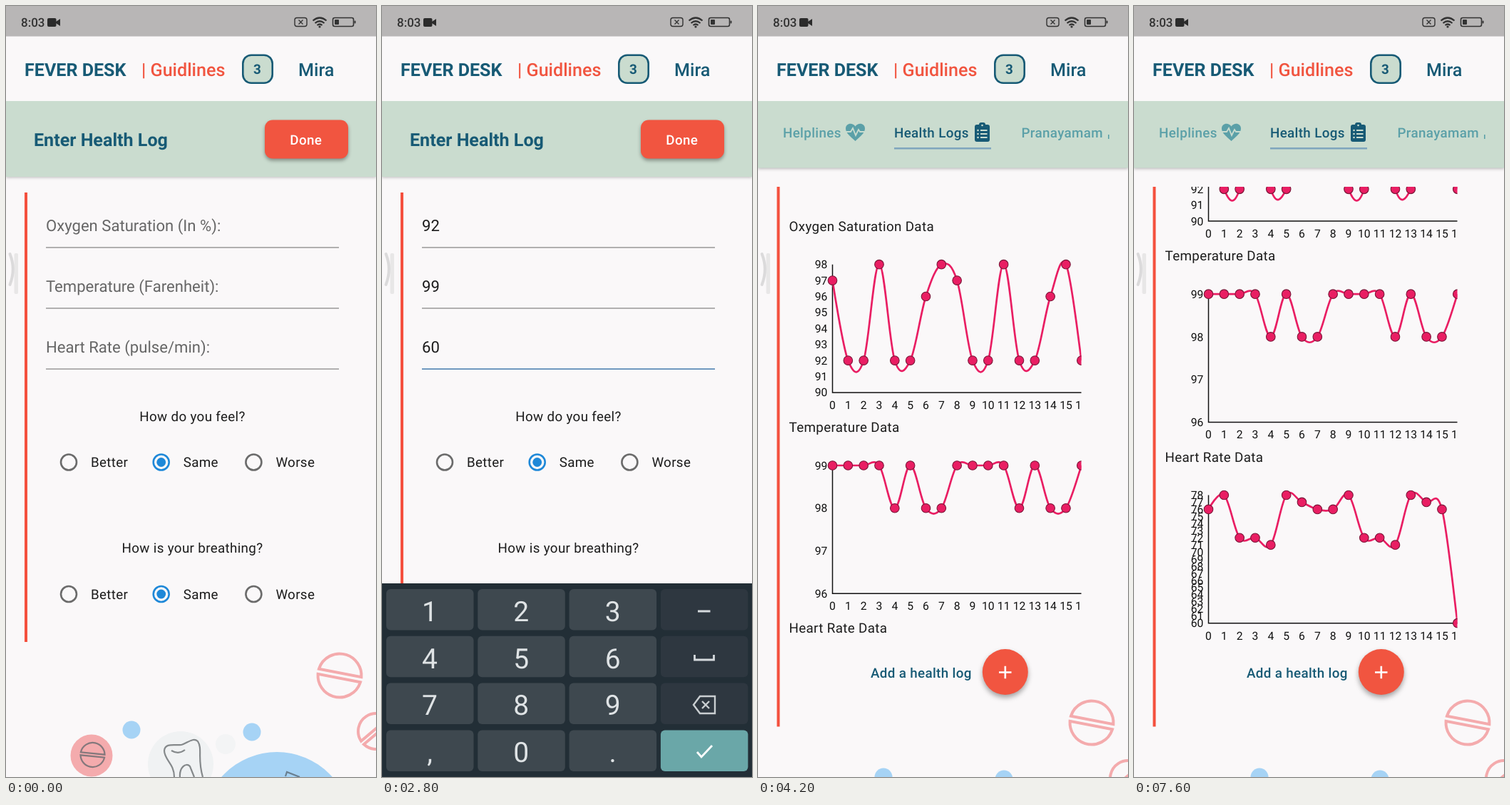
An HTML page with a canvas that plays this animation: 519x1079 px, repeating every 7.7 s.

```html
<!DOCTYPE html>
<html lang="en">
<head>
<meta charset="utf-8">
<title>Health log</title>
<style>
  html, body { margin: 0; height: 100%; overflow: hidden; background: #faf8f9; }
  canvas { display: block; width: 519px; height: 1079px; }
</style>
</head>
<body>
<canvas id="stage" width="519" height="1079"></canvas>
<script>
const W = 519, H = 1079, LOOP = 7700, STEP = 100, BODY = 18.8, FIELD = 22.1, HEAD = 25.1;
const PAPER = '#faf8f9', GREEN = '#cadccf', NAVY = '#175a75', RED = '#f15540', TEAL = '#5ba0a8',
      PINK = '#e91e63', BLUE = '#1e88d8', INK = '#1c1c1c', GREY = '#6b6b6b', ROSE = '#f4abad', SKY = '#a6d3f5';
const c = document.getElementById('stage').getContext('2d');
c.textRendering = 'geometricPrecision';
let t = 0;

const ramp = (a, b) => Math.min(1, Math.max(0, (t - a) / (b - a)));
const easeOut = p => 1 - (1 - p) ** 3;

function text(str, x, y, color = INK, size = BODY, weight = 400, align = 'left') {
  c.font = `${weight} ${size}px Roboto, sans-serif`;
  c.letterSpacing = size === BODY ? '0.34px' : '0px';
  c.textAlign = align;
  c.fillStyle = color;
  c.fillText(str, x, y + size * 0.355);
}
function rect(x, y, w, h, color, r = 0) {
  c.beginPath();
  c.roundRect(x, y, w, h, r);
  c.fillStyle = color;
  c.fill();
}
function disc(x, y, r, color) {
  c.beginPath();
  c.arc(x, y, r, 0, 7);
  c.fillStyle = color;
  c.fill();
}
function stroke(path, color, width) {
  c.strokeStyle = color;
  c.lineWidth = width;
  c.stroke(new Path2D(path));
}
const fill = (path, color) => { c.fillStyle = color; c.fill(new Path2D(path)); };

function shadowed(blur, dy, alpha, draw) {
  c.save();
  c.shadowBlur = blur;
  c.shadowOffsetY = dy;
  c.shadowColor = `rgba(0,0,0,${alpha})`;
  draw();
  c.restore();
}
function clipped(x, y, w, h, draw) {
  c.save();
  c.beginPath();
  c.rect(x, y, w, h);
  c.clip();
  draw();
  c.restore();
}

// ---------- shared chrome ----------
function statusBar() {
  rect(0, 0, W, 42.5, '#b8b6b6');
  text('8:03', 21, 23, '#333', 17, 500);
  let x = 58;
  if (t >= 300 && t < 2800) {
    rect(60, 18, 15, 9, '#444', 1);
    for (let i = 0; i < 5; i++) {
      rect(61.5 + i * 2.6, 20, 1.3, 1.3, '#b8b6b6');
      rect(61.5 + i * 2.6, 22.3, 1.3, 1.3, '#b8b6b6');
    }
    x = 82;
  }
  rect(x, 17, 12.5, 12, '#2b2b2b', 2);
  fill(`M${x + 12} 22l6 -4v10l-6 -4z`, '#2b2b2b');
  stroke('M408 16.5h11q3 0 3 3v6q0 3 -3 3h-11q-3 0 -3 -3v-6q0 -3 3 -3zM410.5 19.5l6 6m0 -6l-6 6', '#333', 1.4);
  stroke('M430.5 20.5q9.500 -8 19 0M433.500 24q6.500 -5.500 13 0M436.500 27q3.500 -3 7 0', '#333', 2.2);
  disc(440, 29, 1.6, '#333');
  stroke('M461 16.500h24q2.500 0 2.500 2.500v7q0 2.500 -2.500 2.500h-24q-2.500 0 -2.500 -2.500v-7q0 -2.500 2.500 -2.500z', '#333', 1.6);
  rect(461, 19, 6, 7, '#333', 1);
  rect(488.5, 20.5, 2, 4, '#333', 1);
}

function header(bandHeight) {
  shadowed(4, 1, 0.25, () => rect(0, 133, W, bandHeight, GREEN));
  rect(0, 42, W, 91, PAPER);
  text('FEVER DESK', 26, 89, NAVY, HEAD, 600);
  text('| Guidlines', 190, 89, RED, HEAD, 500);
  rect(331, 67.5, 44, 41.5, NAVY, 13);
  rect(333.6, 70, 38.8, 36.5, GREEN, 10.5);
  text('3', 352.5, 88.5, NAVY, BODY, 600, 'center');
  text('Mira', 410, 89, NAVY, HEAD, 500);
}

function pill(x, y, r, angle, color, width) {
  c.save();
  c.translate(x, y);
  c.rotate(angle);
  c.strokeStyle = color;
  c.lineWidth = width;
  for (const turn of [0, Math.PI]) {
    c.rotate(turn);
    c.beginPath();
    c.arc(0, 0, r, 0.12, Math.PI - 0.12);
    c.closePath();
    c.stroke();
  }
  c.restore();
}

function backdrop(dy) {
  c.save();
  c.translate(0, dy);
  pill(468, 937, 30.5, 0.19, ROSE, 4);
  pill(519, 1015, 25, -0.7, ROSE, 4);
  disc(176, 1013, 12.5, SKY);
  disc(345, 1016, 12.5, SKY);
  disc(120, 1049, 29.5, ROSE);
  pill(121.5, 1048, 17, 0.1, '#85787c', 2.2);
  disc(245, 1061, 46, '#f0f2f3');
  disc(308, 1033, 14, '#f3f4f5');
  stroke('M236 1079C236 1060 222 1055 222 1042C223 1031 236 1035 246 1034C254 1032 262 1023 269 1029' +
         'C276 1040 268 1052 276 1079M244 1079C243 1066 252 1058 258 1064L264 1079M232 1042q10 6 19 -1', '#85898b', 2.2);
  disc(380, 1148, 104, SKY);
  stroke('M392 1078l2 -6l18 7', '#6a7f90', 2.2);
  c.restore();
}

// ---------- form ----------
const presses = [[500, '9'], [700, '2'], [900, 'ok'], [1100, '9'], [1300, '9'], [1500, 'ok'],
                 [1700, '6'], [2500, '0'], [2600, 'ok']];

function formState() {
  const values = ['', '', ''];
  let focus = 0;
  for (const [at, key] of presses) {
    if (t < at + 100) break;
    if (key === 'ok') focus++;
    else values[focus] += key;
  }
  return { values, focus: t < 100 ? -1 : focus };
}

function question(title, y) {
  text(title, 261.5, y, INK, BODY, 400, 'center');
  ['Better', 'Same', 'Worse'].forEach((label, i) => {
    const x = 88 + i * 129.7, on = i === 1, color = on ? BLUE : GREY;
    c.beginPath();
    c.arc(x, y + 64.5, 11, 0, 7);
    c.strokeStyle = color;
    c.lineWidth = 2.6;
    c.stroke();
    if (on) disc(x, y + 64.5, 6.4, BLUE);
    text(label, x + 31, y + 64.5);
  });
}

function formPage() {
  rect(0, 0, W, H, PAPER);
  backdrop(0);
  header(106);
  text('Enter Health Log', 39, 187, NAVY, HEAD, 600);
  shadowed(5, 3, 0.35, () => rect(363, 159.5, 117, 54, RED, 11));
  text('Done', 420.7, 187, '#fff', BODY, 500, 'center');
  rect(26, 261, 4, 629, '#f4503e');

  const { values, focus } = formState();
  ['Oxygen Saturation (In %):', 'Temperature (Farenheit):', 'Heart Rate (pulse/min):'].forEach((hint, i) => {
    const y = 307 + i * 85;
    text(values[i] || hint, 56, y, values[i] ? INK : '#666', FIELD);
    stroke(`M56 ${y + 31}H467`, '#999', 1.4);
    const glow = i === focus ? 1 : i === 2 && focus === 3 ? 1 - ramp(2700, 2900) : 0;
    if (glow) stroke(`M56 ${y + 31}H467`, `rgba(49,132,210,${glow})`, 1 + 2 * glow);
  });
  question('How do you feel?', 574);
  question('How is your breathing?', 758.5);
}

function keyboard() {
  const shown = easeOut(ramp(200, 500)) * (1 - ramp(2800, 3100) ** 2);
  if (!shown) return;
  const down = presses.find(([at]) => t >= at && t < at + 100)?.[1];
  c.save();
  c.translate(0, (1 - shown) * 271);
  rect(0, 808, W, 271, '#222e36');
  ['1', '2', '3', '-', '4', '5', '6', '_', '7', '8', '9', '<', ',', '0', '.', 'ok'].forEach((key, i) => {
    const x = 6 + (i % 4) * 128.3, y = 816 + (i >> 2) * 65.8, side = i % 4 === 3;
    const base = key === 'ok' ? '#6aa7a8' : side ? '#2e3740' : '#3e484f';
    rect(x, y, 122.5, 57.5, key === down ? (side ? '#86bcbc' : '#5a6465') : base, 6);
    if (!side) text(key, x + 61, y + 31, '#dfe3e5', 39, 400, 'center');
  });
  stroke('M443 847h17.500M438.500 908v7h27v-7', '#d5dadd', 2.8);
  stroke('M446 966h21v24h-21l-9 -12zM449 973l10 10m0 -10l-10 10', '#c9ced1', 2.4);
  stroke('M442 1044l6 7l15 -16', '#fff', 2.8);
  c.restore();
}

function dialog() {
  const alpha = ramp(3300, 3600) * (1 - ramp(3700, 3900));
  if (!alpha) return;
  rect(0, 0, W, H, `rgba(0,0,0,${0.54 * alpha})`);
  c.save();
  c.globalAlpha = alpha;
  shadowed(42, 18, 0.4, () => rect(53, 450, 413, 221.5, '#fff', 5));
  ['Your oxygen saturation is below', 'normal! Please check in with your', 'doctor']
    .forEach((line, i) => text(line, 83.5, 490 + i * 26.4, INK, FIELD));
  if (t >= 3700) disc(388, 637, 10 + 60 * ramp(3700, 3900), 'rgba(30,136,216,.1)');
  text('Check out the HelpLines', 233, 630, BLUE, BODY, 500);
  c.restore();
}

// ---------- charts ----------
const LEFT = 104.5, GAP = 21.83, TALL = 179.2;
const charts = [
  { title: 'Oxygen Saturation Data', min: 90, max: 98,
    data: [97, 92, 92, 98, 92, 92, 96, 98, 97, 92, 92, 98, 92, 92, 96, 98, 92],
    touch: () => t >= 4800 && t < 6100 ? Math.round(9 - 8 * ramp(5100, 6000)) : -1 },
  { title: 'Temperature Data', min: 96, max: 99,
    data: [99, 99, 99, 99, 98, 99, 98, 98, 99, 99, 99, 99, 98, 99, 98, 98, 99],
    touch: () => -1 },
  { title: 'Heart Rate Data', min: 60, max: 78,
    data: [76, 78, 72, 72, 71, 78, 77, 76, 76, 78, 72, 72, 71, 78, 77, 76, 60],
    touch: () => t >= 7000 && t < 7600 ? Math.round(5 + 9 * ramp(7000, 7500)) : -1 },
];

function dot(x, y, r) {
  disc(x, y, r, PINK);
  c.strokeStyle = '#7a1638';
  c.lineWidth = 1.1;
  c.stroke();
}

function curve(points) {
  const smooth = 0.35;
  let dx = 0, dy = 0;
  c.beginPath();
  c.moveTo(...points[0]);
  for (let i = 1; i < points.length; i++) {
    const [px, py] = points[i - 1], [x, y] = points[i], [nx, ny] = points[i + 1] || points[i];
    const ox = px + dx, oy = py + dy;
    dx = (nx - px) / 2 * smooth;
    dy = (ny - py) / 2 * smooth;
    c.bezierCurveTo(ox, oy, x - dx, y - dy, x, y);
  }
  c.strokeStyle = PINK;
  c.lineWidth = 2.7;
  c.stroke();
}

function chart({ title, min, max, data, touch }, index) {
  const top = 361.7 + index * 281.3, bottom = top + TALL;
  const yOf = v => bottom - (v - min) / (max - min) * TALL;
  const points = data.map((v, i) => [LEFT + i * GAP, yOf(v)]);
  text(title, 43.5, top - 53.5);
  for (let v = min; v <= max; v++) text(v, 97.3, yOf(v), '#111', 15.7, 400, 'right');
  clipped(44, top - 60, 409.5, 281, () => {
    data.forEach((_, i) => text(i, LEFT + i * GAP, bottom + 17.5, '#111', 15.7, 400, 'center'));
    stroke(`M${LEFT} ${top}V${bottom}H454`, '#111', 1.5);
    curve(points);
    const active = touch();
    if (active >= 0) stroke(`M${points[active][0]} ${points[active][1]}V${bottom}`, PINK, 5);
    points.forEach(([x, y], i) => dot(x, y, i === active ? 10.5 : 6.3));
    if (active < 0) return;
    const [x, y] = points[active];
    rect(x - 41, y - 64, 82, 43, '#fff', 5);
    text(data[active].toFixed(1), x, y - 42, PINK, 20, 700, 'center');
  });
}

function tabs() {
  text('Helplines', 35, 177, TEAL, BODY, 500);
  fill('M136.500 189C129 182 123 178 123 171.500C123 164 132.500 162.500 136.500 168.500' +
       'C140.500 162.500 150 164 150 171.500C150 178 144 182 136.500 189z', TEAL);
  stroke('M123 176h7l3 -5l4 10l4 -8l2 3h7', GREEN, 1.8);
  text('Health Logs', 191, 177, NAVY, BODY, 500);
  rect(304, 166, 21, 24, NAVY, 3);
  rect(310, 163, 9, 7, NAVY, 3);
  disc(314.5, 167, 1.3, GREEN);
  for (let y = 174; y < 188; y += 5) {
    disc(308.5, y, 1.3, GREEN);
    rect(312, y - 1, 9.5, 2, GREEN);
  }
  rect(191, 198, 136, 2.6, '#7fa6bd');
  text('Pranayamam', 369.5, 177, TEAL, BODY, 500);
  rect(491, 180, 1.6, 6, TEAL);
}

function chartPage() {
  const shown = easeOut(ramp(3700, 4000));
  if (!shown) return;
  c.save();
  c.globalAlpha = shown;
  rect(0, 0, W, H, PAPER);
  backdrop(66);
  header(93.5);
  tabs();
  rect(26.5, 253, 4, 755.5, '#f4503e');
  clipped(42, 253, 420, 647.5, () => {
    c.save();
    c.translate(0, -239.8 * easeOut(ramp(6100, 6400)));
    charts.forEach(chart);
    c.restore();
    const glow = ramp(6200, 6400) * (1 - ramp(6400, 6900));
    clipped(44, 800, 409.5, 100, () => {
      c.beginPath();
      c.ellipse(310, 945, 340, 100, 0, 0, 7);
      c.fillStyle = `rgba(33,120,230,${0.05 * glow})`;
      c.fill();
    });
  });
  text('Add a health log', 158, 933, NAVY, BODY, 500);
  shadowed(7, 4, 0.35, () => disc(346.8, 932, 32, RED));
  stroke('M338 932.500h17.500M346.800 923.800v17.500', '#fff', 2.6);
  c.restore();
}

function edgeHandle() {
  const color = 'rgba(200,200,200,.62)';
  rect(11.5, 346, 5.5, 57, 'rgba(205,205,205,.4)', 2);
  c.lineCap = 'round';
  stroke('M5.500 347Q14 368 5.500 390', color, 4);
  c.lineCap = 'butt';
}

function frame() {
  t = Math.floor(performance.now() % LOOP / STEP) * STEP;
  if (t < 4000) formPage();
  chartPage();
  keyboard();
  statusBar();
  dialog();
  edgeHandle();
  requestAnimationFrame(frame);
}
frame();
</script>
</body>
</html>
```
